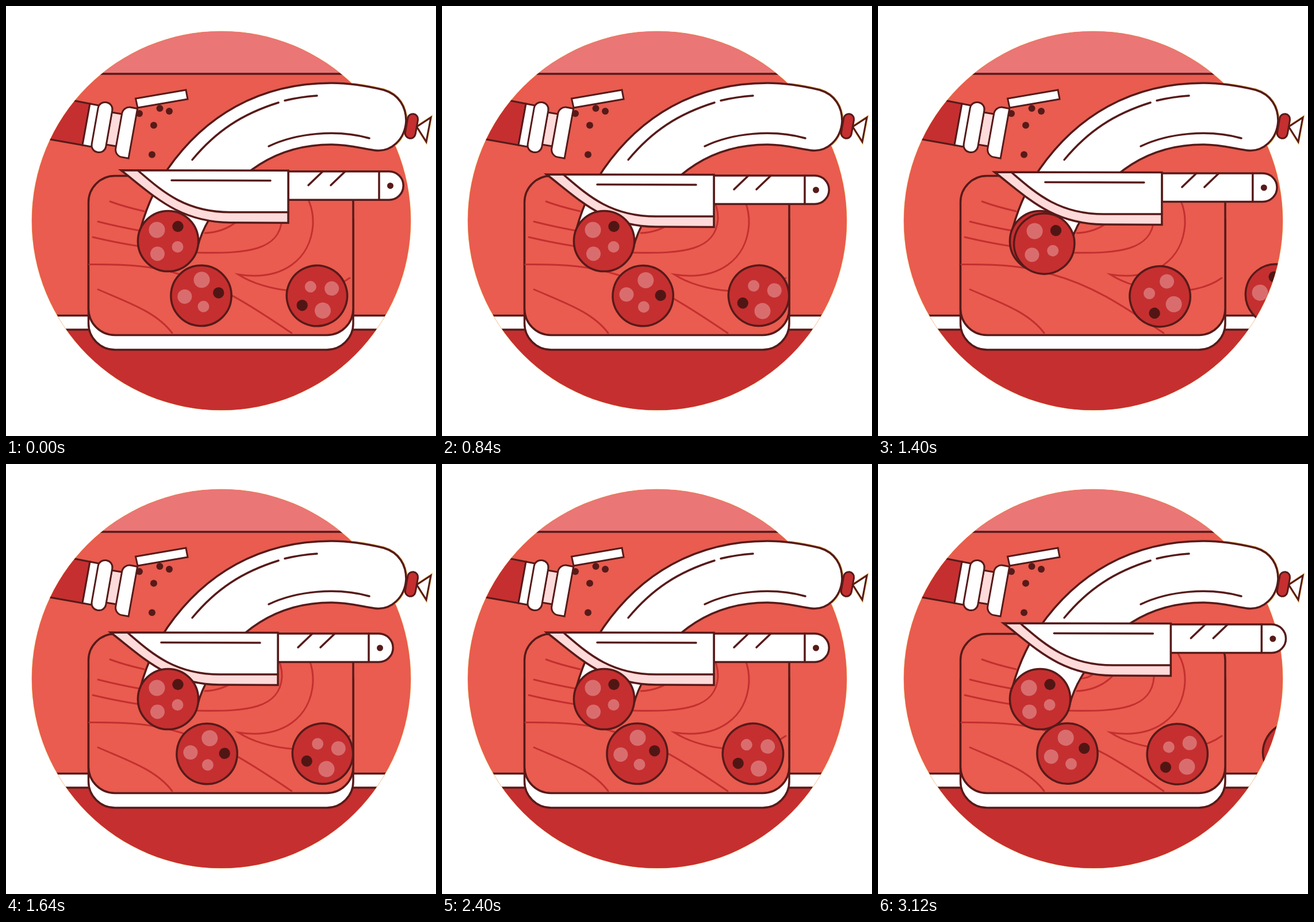
Animation of 748x748 px, one loop 3.16 s. Source, as an HTML page with a canvas:

```html
<!DOCTYPE html>
<html lang="en">
<head>
<meta charset="utf-8">
<title>Slicing sausage</title>
<style>
html, body { margin: 0; width: 100%; height: 100%; overflow: hidden; background: #fff; }
canvas { display: block; width: 748px; height: 748px; }
</style>
</head>
<body>
<canvas id="stage" width="748" height="748"></canvas>
<script>
const ctx = document.getElementById('stage').getContext('2d');
const SIZE = 748, STEP = 40, FRAMES = 79;
const INK = '#571a19', RED = '#c52f30', CORAL = '#e95c4f', ROSE = '#ea7676',
      PINK = '#fedbda', FAT = '#d96d6e', WHITE = '#fff', GOLD = '#efb548';
const TAU = Math.PI * 2;
const DISC = { x: 374.5, y: 373.5, r: 329.5 };

function shape(path, fill, stroke = INK, width = 3.5) {
  const p = typeof path === 'string' ? new Path2D(path) : path;
  if (fill) { ctx.fillStyle = fill; ctx.fill(p); }
  if (stroke) { ctx.strokeStyle = stroke; ctx.lineWidth = width; ctx.stroke(p); }
}

function dot(x, y, r, fill, stroke = null) {
  const p = new Path2D();
  p.arc(x, y, r, 0, TAU);
  shape(p, fill, stroke);
}

function box(x, y, w, h, r, fill, stroke = INK, width = 3.5) {
  const p = new Path2D();
  p.roundRect(x, y, w, h, r);
  shape(p, fill, stroke, width);
}

// A rounded box centred on a point and turned by some degrees.
function tiltedBox(x, y, w, h, deg, r, fill) {
  ctx.save();
  ctx.translate(x, y);
  ctx.rotate(deg * Math.PI / 180);
  box(-w / 2, -h / 2, w, h, r, fill, INK, 3);
  ctx.restore();
}

function clipped(draw) {
  ctx.save();
  ctx.beginPath();
  ctx.arc(DISC.x, DISC.y, DISC.r, 0, TAU);
  ctx.clip();
  draw();
  ctx.restore();
}

const GRAIN = [
  'M181 340Q205 349 240 357',
  'M160 375Q195 384 234 391',
  'M151 402Q188 411 232 418',
  'M145 449.5C215 449 260 453 300 466C370 485 420 517 497 569',
  'M160 493C210 515 262 532 289 569',
  'M430 298C465 316 481 342 480 371C476 425 420 431 333 429',
  'M497 299C527 328 535 352 534 380C530 440 482 479 404 467C450 497 545 511 598 473',
  'M401 311C423 332 421 360 400 376C385 388 365 394 346 395',
  'M378 332C386 350 381 370 355 373'
];

const SAUSAGE = 'M230 404C240 360 258 318 281 284C345 192 440 134 566 134' +
  'C600 134 628 139 657 146C684 154 696 176 696 200C694 232 670 255 641 251' +
  'C615 247 595 241 566 241C470 241 400 290 354 370C345 385 338 400 333 420Z';
const KNOT_TAIL = 'M714.5 210L739 194L731 236Z';

function scene() {
  ctx.fillStyle = CORAL;
  ctx.fillRect(0, 0, SIZE, SIZE);
  ctx.fillStyle = ROSE;
  ctx.fillRect(0, 0, SIZE, 118);
  shape('M0 118H748');
  ctx.fillStyle = WHITE;
  ctx.fillRect(0, 538, SIZE, 25);
  ctx.fillStyle = RED;
  ctx.fillRect(0, 563, SIZE, 185);
  shape('M0 538.5H748M0 563H748');
}

function board() {
  box(143.5, 330, 460.5, 268, 46, WHITE);
  box(143.5, 295.5, 460.5, 277, 46, CORAL);
  GRAIN.forEach(g => shape(g, null, RED, 3));
}

function bottle() {
  shape('M90 159L146 170L133 242L60 229Z', RED, INK, 3);
  shape('M146 170L172 175L160 247L133 242Z', WHITE, INK, 3);
  shape('M184 185L202 188L192 244L174 241Z', PINK, INK, 3);
  tiltedBox(167, 211, 25, 88, 10, 12, WHITE);
  for (const [x, y] of [[232, 187], [267.5, 178], [284, 183], [257, 207.5], [254, 258.5]])
    dot(x, y, 6, INK);
  tiltedBox(208.6, 219.5, 25, 88, 10.2, [13, 0, 0, 13], WHITE);
  shape('M225.5 161L313 146L316 162L229 177Z', WHITE, INK, 3);
}

function sausage() {
  // Thin warm rim where the sausage leaves the round backdrop.
  ctx.save();
  const outside = new Path2D();
  outside.rect(0, 0, SIZE, SIZE);
  outside.arc(DISC.x, DISC.y, DISC.r + 1, 0, TAU);
  ctx.clip(outside, 'evenodd');
  shape(SAUSAGE, null, GOLD, 5);
  shape(KNOT_TAIL, null, GOLD, 4.5);
  ctx.restore();

  shape(SAUSAGE, WHITE);
  shape('M324 267.5C365 218 410 188 474 168M485 164.5Q512 158 541 156' +
        'M457 244C505 221 575 214 632 230', null);
  shape(KNOT_TAIL, WHITE, INK, 3);
  tiltedBox(705.5, 209, 18, 43, 10, 9, RED);
}

function knife([x, y]) {
  ctx.save();
  ctx.translate(x, y);
  shape('M291 2H466.5A24.75 24.75 0 0 1 466.5 51.5H291Z', WHITE);
  shape('M449 2V51.5M326 26L351 2M365 26L390 2', null);
  dot(468.5, 27, 5.5, INK);
  const edge = 'M0 0C58 45 100 90 190 91L291 91.5V73H190C110 73 70 35 29 0Z';
  shape('M0 0H291V91.5H190C100 90 58 45 0 0Z', WHITE, null);
  shape(edge, PINK, null);
  shape('M29 0C70 35 110 73 190 73H291M88 17.5L260 18', null);
  shape('M0 0L291 .5V91.5L190 91C100 90 58 45 0 0Z', null);
  ctx.restore();
}

function slice(x, y, deg) {
  ctx.save();
  ctx.translate(x, y);
  ctx.rotate(deg * Math.PI / 180);
  dot(0, 0, 52.6, RED, INK);
  dot(-19.5, -19.5, 14, FAT);
  dot(16.5, 10, 10, FAT);
  dot(-18.5, 22, 12.5, FAT);
  dot(17, -25.5, 9.7, '#511614');
  ctx.restore();
}

const mix = (a, b, u) => [a[0] + (b[0] - a[0]) * u, a[1] + (b[1] - a[1]) * u];
const TOP = [222, 272.8], LOW = [107, 370], ENTRY = [182, 293], BEND = [126.5, 315.5];

// Tip of the knife for a phase of 0 to 20 steps.
function knifeTip(p) {
  if (p < 1) return mix([200, 285.7], ENTRY, p);
  if (p < 7) {
    const u = (p - 1) / 6;
    return mix(mix(ENTRY, BEND, u), mix(BEND, LOW, u), u);
  }
  if (p < 9) return LOW;
  if (p < 16.2) return mix(LOW, TOP, (p - 9) / 7.2);
  if (p < 18.4) return TOP;
  if (p < 19) return mix(TOP, [218.3, 277], (p - 18.4) / 0.6);
  return mix([218.3, 277], [200, 285.7], p - 19);
}

// A cut slice drops off, then rolls away to the right.
function rollingSlice(age) {
  const turn = 7.83 * age;
  const x = Math.max(282, 279.1 + 10.07 * age);
  const fall = age / 4.6;
  const y = fall < 1 ? 409 + 95 * fall * fall
                     : 503.6 + 2 * Math.cos((turn - 128) * Math.PI / 180);
  slice(x, y, turn);
}

const CUTS = [-46, -26, -6, 14, 34, 54, 73];

function draw(frame) {
  const phase = frame >= 59 ? frame - 59 : frame % 20;
  ctx.lineJoin = 'miter';
  ctx.lineCap = 'round';
  ctx.fillStyle = WHITE;
  ctx.fillRect(0, 0, SIZE, SIZE);
  dot(DISC.x, DISC.y, DISC.r + 0.5, GOLD);
  clipped(() => { scene(); board(); bottle(); });
  sausage();
  knife(knifeTip(phase));
  slice(282, 409, 0);
  clipped(() => {
    for (const cut of CUTS) {
      const age = frame - cut;
      if (age >= 0 && age < 50) rollingSlice(age);
    }
  });
}

function tick() {
  draw(Math.floor((performance.now() + 0.5) / STEP) % FRAMES);
  requestAnimationFrame(tick);
}
tick();
</script>
</body>
</html>
```
